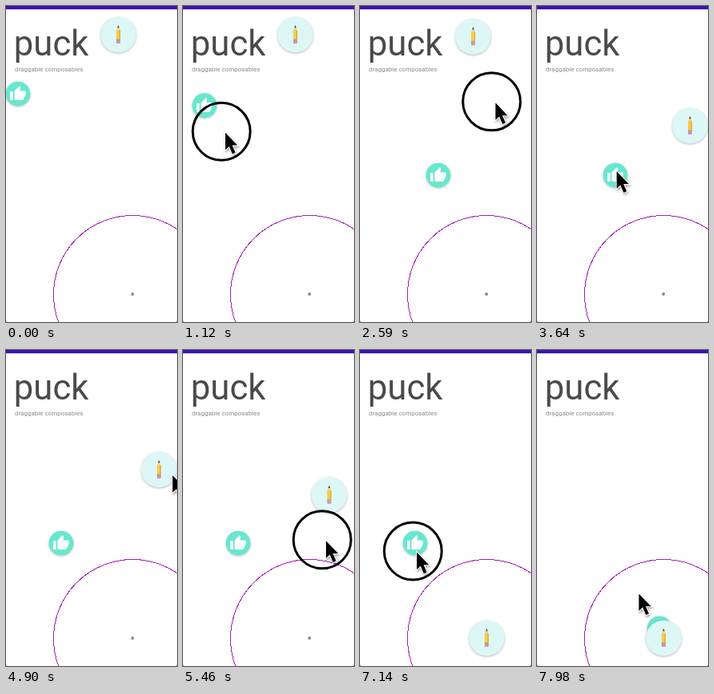
An HTML page for the animation above (8 s loop, 214 by 396 pixels).

```html
<!DOCTYPE html>
<html lang="en">
<head>
<meta charset="utf-8">
<title>Draggable composables</title>
<style>
  html, body { margin: 0; width: 100%; height: 100%; overflow: hidden; background: #fff; }
  svg { display: block; width: 214px; height: 396px; }
  text { font-family: Roboto, sans-serif; }
  .puck { filter: drop-shadow(0 1.5px 1.5px rgba(0, 0, 0, .28)); }
  .arrow { filter: drop-shadow(1px 2px 1.5px rgba(0, 0, 0, .35)); }
</style>
</head>
<body>
<svg viewBox="0 0 214 396">
  <rect width="214" height="396" fill="#fff"/>
  <rect width="214" height="4.2" fill="#3b12b4"/>
  <text x="9.8" y="62" font-size="43.7" fill="#4a4a4a">puck</text>
  <text x="11" y="82" font-size="8" fill="#8a8a8a">draggable composables</text>
  <path d="M0 394.5V396H1.5ZM214 394.5V396H212.5Z" fill="#777"/>
  <circle cx="158.5" cy="361.5" r="99" fill="none" stroke="#a81cba" shape-rendering="crispEdges"/>
  <circle cx="158.2" cy="361" r="2" fill="#8c8c8c"/>

  <g id="thumb" class="puck">
    <circle r="15.3" fill="#66e8cd"/>
    <path transform="scale(.9) translate(-12 -12)" fill="#fff" d="M1 21h4V9H1v12zM23 10c0-1.1-.9-2-2-2h-6.3l1-4.9c0-.4-.2-.8-.5-1.1L14.2 1 7.6 7.6C7.2 8 7 8.5 7 9v10c0 1.1.9 2 2 2h9c.8 0 1.5-.5 1.8-1.2l3-7.1c.1-.2.2-.5.2-.7z"/>
  </g>

  <g id="pencil" class="puck">
    <circle r="22.3" fill="#dcf7f6"/>
    <g transform="scale(.85 1)">
      <path d="M-3 -5L0 -12L3 -5V-4H-3Z" fill="#f2cf9b"/>
      <path d="M-1.4 -8.8L0 -12L1.4 -8.8Z" fill="#3c3632"/>
      <path d="M-3 -5L-1.5 -6L0 -5L1.5 -6L3 -5V6H-3Z" fill="#f9cc45"/>
      <path d="M1.5 -6L3 -5V6H1.5Z" fill="#e0a636"/>
      <path d="M-3 5.5H3V8H-3Z" fill="#9aa5ad"/>
      <path d="M-3 8H3V9.5Q3 11 1.5 11H-1.5Q-3 11 -3 9.5Z" fill="#ee86a8"/>
    </g>
  </g>

  <g id="cursor">
    <circle id="ring" cx="-4.3" r="36" fill="none" stroke="#000" stroke-width="3"/>
    <path class="arrow" transform="translate(.5 1.5) scale(.95)" d="M0 0V22.5L5 18L9.3 28L13.2 26.3L9 16.6H16Z" stroke="#fff" stroke-width="2.2" paint-order="stroke"/>
  </g>
</svg>
<script>
const LOOP = 8000, STEP = 70;
const LAG = 180;                    // pucks trail the pointer
const RING_DELAY = 140, SNAP = 210;
const DOCK = [158.5, 361], ENTRY = [194, 347];

const pucks = {
  thumb: { home: [15, 110], dockAt: 7830 },
  pencil: { home: [140.5, 36], dockAt: 6090 }
};

// Pointer moves; one with a puck is a drag
const moves = [
  { at: 70, dur: 630, to: [18, 115] },
  { at: 730, dur: 880, to: [101, 217], puck: 'thumb' },
  { at: 1750, dur: 630, to: [136, 46] },
  { at: 2380, dur: 350, to: [187, 160], puck: 'pencil' },
  { at: 2870, dur: 630, to: [100, 205] },
  { at: 3600, dur: 400, to: [71, 235], puck: 'thumb' },
  { at: 4200, dur: 280, to: [240, 180] },
  { at: 4690, dur: 280, to: [202, 151] },
  { at: 5080, dur: 630, to: [166, 284], puck: 'pencil' },
  { at: 6300, dur: 630, to: [64, 246] },
  { at: 7000, dur: 700, to: [127, 304], puck: 'thumb' }
];
moves.forEach((m, i) => {
  const from = i ? moves[i - 1].to : ENTRY;
  m.by = m.to.map((v, k) => v - from[k]);
});

const el = id => document.getElementById(id);
const place = (id, [x, y]) => el(id).setAttribute('transform', `translate(${x} ${y})`);
const show = (id, on) => { el(id).style.display = on ? '' : 'none'; };

function ease(t, at, dur) {
  const u = Math.min(1, Math.max(0, (t - at) / dur));
  return u * u * (3 - 2 * u);
}

const travel = (start, list, t) =>
  start.map((v, k) => list.reduce((sum, m) => sum + m.by[k] * ease(t, m.at, m.dur), v));

const drags = id => moves.filter(m => m.puck === id);
const pressed = t => moves.some(m =>
  m.puck && t >= m.at + RING_DELAY && t < m.at + m.dur + RING_DELAY);

function draw(now) {
  const t = Math.floor(now % LOOP / STEP) * STEP;
  for (const id in pucks) {
    const { home, dockAt } = pucks[id];
    const snap = ease(t, dockAt, SNAP);
    const pos = travel(home, drags(id), t - LAG);
    place(id, pos.map((v, k) => v + (DOCK[k] - v) * snap));
  }
  place('cursor', travel(ENTRY, moves, t));
  show('cursor', t >= moves[0].at);
  show('ring', pressed(t));
}

const start = performance.now();
function tick() {
  draw(performance.now() - start);
  requestAnimationFrame(tick);
}
tick();
</script>
</body>
</html>
```
